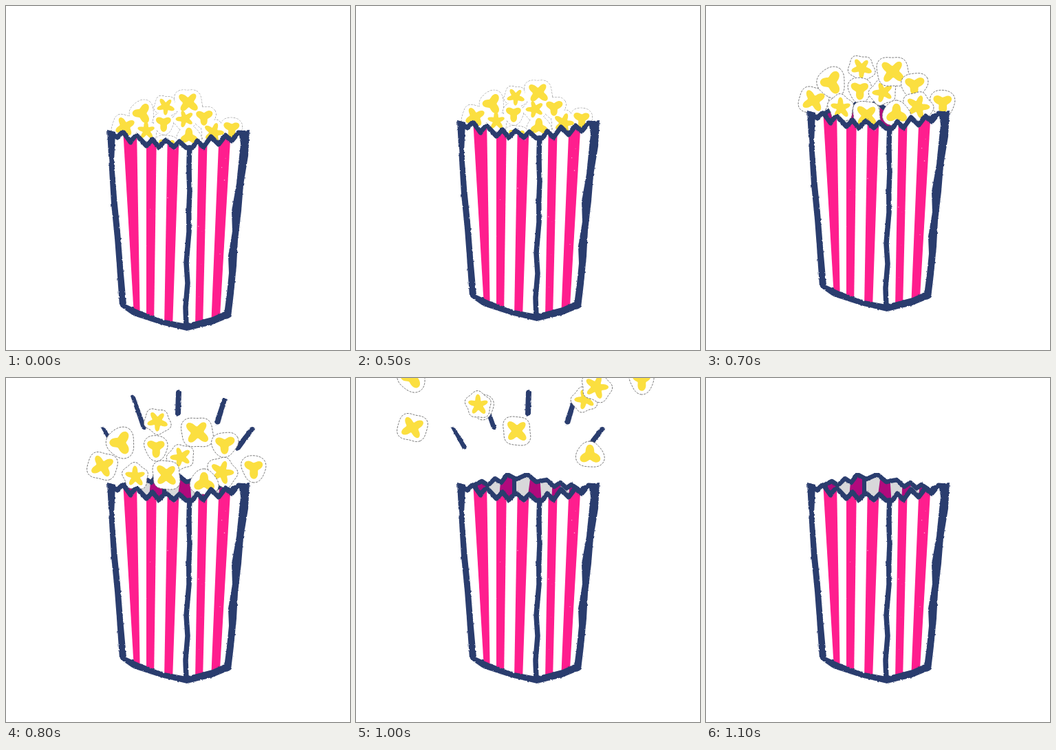
Recreate the animation shown at these times as an HTML page. Size 500 by 500 pixels, loop 1.6 s.

```html
<!DOCTYPE html>
<html lang="en">
<head>
<meta charset="utf-8">
<title>Popcorn</title>
<style>
  html, body { margin: 0; width: 100%; height: 100%; overflow: hidden; background: #fff; }
  svg { display: block; width: 100%; height: 100%; }

  .hop, .pile, .inside, .rays, .flight { animation: 1.6s step-end infinite; }
  .hop { animation-name: hop; }
  .pile { animation-name: pile; }
  .inside { animation-name: inside; }
  .rays { animation-name: rays; }
  .flight { animation-name: blink; animation-delay: calc(var(--start) - 1.6s); }

  @keyframes hop {
    0% { transform: translateY(28px); }
    31.25% { transform: translateY(14px); }
    37.5%, 100% { transform: none; }
  }
  @keyframes pile { 0% { visibility: visible; } 43.75%, 100% { visibility: hidden; } }
  @keyframes inside { 0% { visibility: hidden; } 43.75%, 100% { visibility: visible; } }
  @keyframes rays {
    0% { visibility: hidden; }
    50% { visibility: visible; }
    68.75%, 100% { visibility: hidden; }
  }
  @keyframes blink { 0% { visibility: visible; } 6.25%, 100% { visibility: hidden; } }

  .ink { fill: #2b3c6e; }
  .line { fill: none; stroke: #2b3c6e; stroke-linecap: round; stroke-linejoin: round; }
  .pink { fill: #ff1e8e; }
  .dark { fill: #b10a7d; }
  .edge { fill: #fff; stroke: #777; stroke-width: 1; stroke-dasharray: 3 1.5; }
  .white { fill: #fff; }
  .corn { fill: #fbdf40; }
</style>
</head>
<body>
<svg viewBox="0 0 500 500">
  <defs>
    <filter id="rough" x="-5%" y="-5%" width="110%" height="110%">
      <feTurbulence type="fractalNoise" baseFrequency=".25" numOctaves="2" seed="4"/>
      <feDisplacementMap in="SourceGraphic" scale="2.5" xChannelSelector="R" yChannelSelector="G"/>
    </filter>
    <path id="panel" d="M152 157 162 163 171 155 181 170 191 161 204 175 213 165 222 177 232 166 244 177 252 169 262 178 272 177 277 168 287 177 298 162 309 173 319 160 328 168 338 156 348 157 343 230 333 310 323 419 262 438 170 410 158 290Z"/>
    <path id="back" d="M162 162 175 154 183 150 192 156 202 146 211 152 220 140 233 147 249 140 262 151 277 148 288 158 297 152 306 160 313 155 325 163 338 157"/>
    <clipPath id="front"><use href="#panel"/></clipPath>
    <clipPath id="hollow"><path d="M162 162 183 150 192 156 202 146 211 152 220 140 233 147 249 140 262 151 277 148 288 158 297 152 306 160 313 155 325 163 338 157V185H162Z"/></clipPath>
  </defs>

  <g class="rays ink" filter="url(#rough)">
    <path d="M138 72Q141 70 145 74L161 100Q161 105 155 103Z"/>
    <path d="M181 26Q184 22 188 28L204 72Q203 78 197 73Z"/>
    <path d="M247 20Q251 14 255 20L254 52Q250 58 246 53Z"/>
    <path d="M314 31Q318 27 321 32L311 66Q306 70 303 64Z"/>
    <path d="M355 72Q360 69 362 74L340 104Q334 108 332 101Z"/>
  </g>

  <g class="inside">
    <g clip-path="url(#hollow)">
      <path fill="#d8d8da" d="M160 135H340V185H160Z"/>
      <path class="dark" d="M172 140H190L196 185H180ZM211 140H230V185H207ZM254 140H267L270 185H248ZM286 140H300L294 185H284ZM312 140H332V185H308Z"/>
      <path class="ink" d="M227 140H233V185H227Z"/>
    </g>
    <use href="#back" class="line" stroke-width="6.5" filter="url(#rough)"/>
  </g>

  <g id="flights"></g>

  <g class="hop">
    <g class="pile" id="pile"></g>
    <use href="#panel" class="white"/>
    <g class="pink" clip-path="url(#front)">
      <path d="M170 150H190L195 440H187Z"/>
      <path d="M204 150H219L215 440H204Z"/>
      <path d="M235 150H252L242 440H230Z"/>
      <path d="M280 150H293L286 440H275Z"/>
      <path d="M310 150H327L310 440H298Z"/>
    </g>
    <g id="specks" fill="#fff" opacity=".6" clip-path="url(#front)"></g>
    <g filter="url(#rough)">
      <path class="line" stroke-width="7" d="M152 157 162 163Q167 156 171 156L181 170Q186 161 191 161L204 175 213 166 222 177 232 167 244 177 252 169 262 178H271L278 168 287 177 298 162 309 173 319 160 328 168 338 156 349 157"/>
      <path class="ink" d="M147 152 159 155 157 200 161 250 166 300 170 350 175 406 190 413 225 427 262 434 300 424 320 415 327 424 300 435 263 444 225 435 185 422 165 408 161 350 158 310 153 260 150 210Z"/>
      <path class="ink" d="M338 154 354 152 352 190 345 232 342 270 337 312 335 350 331 390 327 424 317 420 321 390 324 360 323 335 329 300 328 270 335 230 338 200 341 172Z"/>
      <path class="line" stroke-width="7.5" d="M267 178Q265 205 267 240Q265 270 266 300L262 345 264 375 261 410 262 438"/>
    </g>
  </g>
</svg>

<script>
  // lobes, turn in degrees, radius, then x and y: in the pile, bursting, flying
  const kernels = [
    [5, 20, 20, 232, 118, 220, 63, 222, -30],
    [4, 60, 23, 173, 147, 140, 128, 124, 100],
    [3, -60, 23, 198, 128, 167, 94, 140, 46],
    [3, 90, 19, 229, 142, 218, 101, 207, 71],
    [5, -20, 20, 204, 153, 188, 143, 187, 91],
    [5, 35, 20, 260, 136, 254, 115, 282, 73],
    [4, 40, 25, 265, 112, 278, 79, 291, 15],
    [3, -30, 20, 288, 133, 318, 96, 362, -6],
    [3, 90, 20, 328, 150, 360, 131, 375, 67],
    [5, 0, 23, 302, 156, 314, 137, 324, 75],
    [3, -90, 21, 266, 162, 288, 152, 305, 132],
    [4, 45, 23, 234, 178, 233, 141, 234, 109]
  ];

  const mix = (a, b, t) => a + (b - a) * t;

  function blob(x, y, lobes, turn, base, wave) {
    const points = [];
    for (let i = 0; i < 48; i++) {
      const a = i / 48 * Math.PI * 2, r = base + wave * Math.cos(lobes * a) + base * .06 * Math.sin(2 * a + turn);
      const b = a + turn * Math.PI / 180;
      points.push((x + r * Math.cos(b)).toFixed(1) + ' ' + (y + r * Math.sin(b)).toFixed(1));
    }
    return 'M' + points.join('L') + 'Z';
  }

  const path = (cls, d) => `<path class="${cls}" d="${d}"/>`;
  const husk = (cls, [n, turn, r], [x, y]) => path(cls, blob(x, y, n, turn, r * .93, r * .07));
  const corn = ([n, turn, r], [x, y]) => path('corn', blob(x, y, n, turn, r * .56, r * .2));

  const poses = {
    700: k => [mix(k[3], k[5], .5), mix(k[4], k[6], .5)],
    800: k => [k[5], k[6]],
    900: k => [k[7], k[8]],
    1000: k => [250 + (mix(k[5], k[7], 2.5) - 250) * 1.12, mix(k[6], k[8], 2)]
  };

  document.getElementById('flights').innerHTML = Object.entries(poses).map(([start, pose]) =>
    `<g class="flight" style="--start:${start}ms">` +
    kernels.map(k => husk('edge', k, pose(k)) + corn(k, pose(k))).join('') + '</g>').join('');

  const heap = kernels.map(([n, turn, r, x, y]) => [[n, turn, r * .86], [x, y]]);
  document.getElementById('pile').innerHTML =
    heap.map(k => husk('edge', ...k)).join('') +
    heap.map(k => husk('white', ...k)).join('') +
    heap.map(k => corn(...k)).join('');

  let seed = 7;
  const random = () => (seed = seed * 16807 % 2147483647) / 2147483647;
  let specks = '';
  for (let i = 0; i < 50; i++) {
    specks += `<circle cx="${160 + random() * 175}" cy="${180 + random() * 240}" r="${.3 + random() * .5}"/>`;
  }
  document.getElementById('specks').innerHTML = specks;
</script>
</body>
</html>
```
